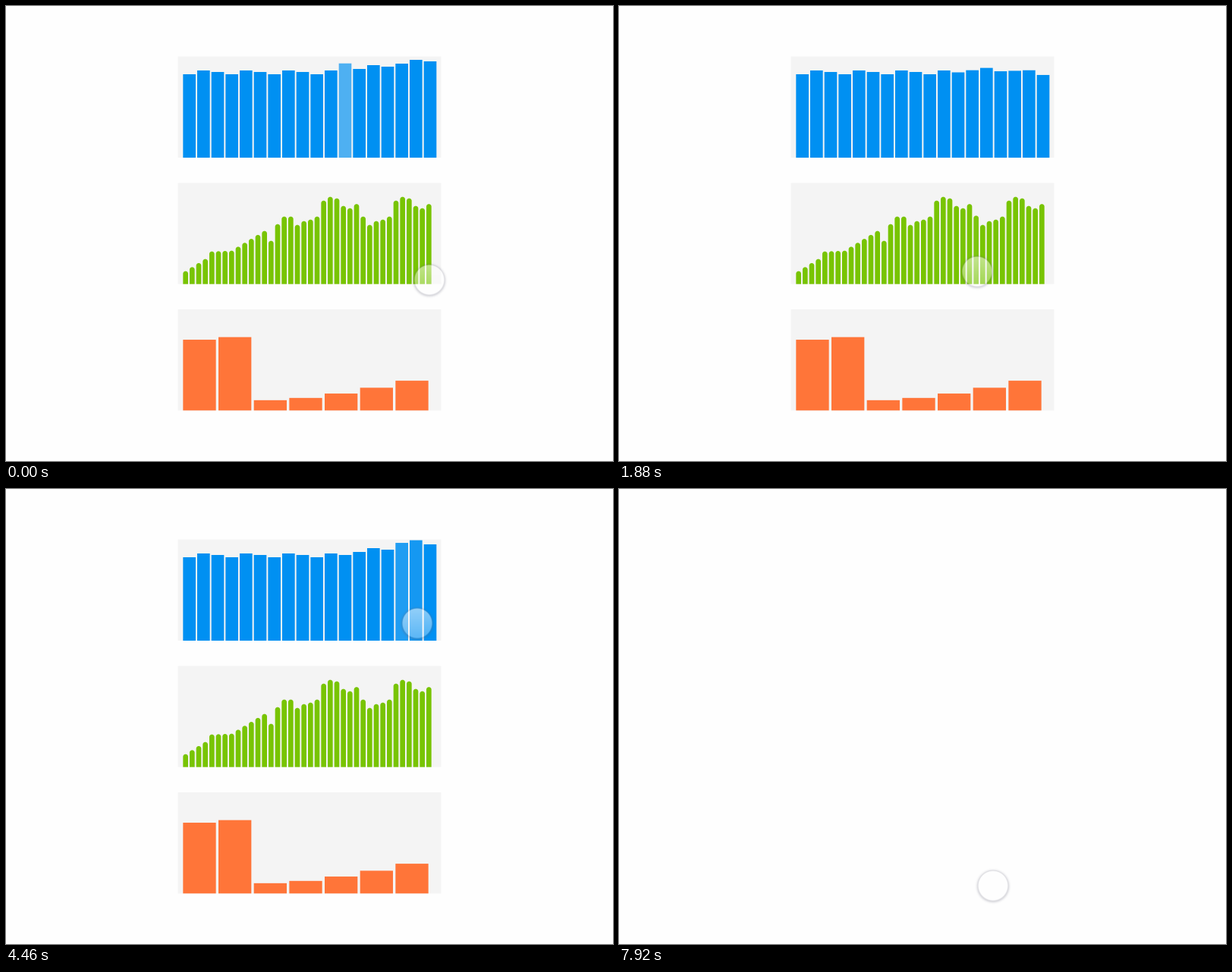
Animation, 800 px wide and 600 px high, one loop 8 s. Source, as a matplotlib script:

```python
import numpy as np
import matplotlib.pyplot as plt
from matplotlib.animation import FuncAnimation
from matplotlib.collections import PolyCollection
from matplotlib.colors import to_rgb
from matplotlib.patches import Polygon, Rectangle

W, H, DPI = 800, 600, 100
STEP, LOOP = 20, 8000
FRAMES = LOOP // STEP
BLANK, LOAD, TOUCH, RELOAD = 140, 360, 1660, 7920
FADE = 150       # hover transition, ms
UNIT = 10 / 3    # pixels per chart unit


def quad_out(u):
    return 1 - (1 - u ** 1.3) ** 2


def linear(u):
    return u


def back_out(u):
    return 1 + 2.70158 * (u - 1) ** 3 + 1.70158 * (u - 1) ** 2


class Chart:
    """Bars on a panel; bar and gap are in units, times in ms."""

    def __init__(self, color, row, heights, bar, gap, start, stagger, span,
                 ease, rounded=False):
        self.color = to_rgb(color)
        self.top = (20 + 50 * row) * UNIT
        self.base = self.top + 40 * UNIT
        self.heights = np.array(heights)
        n = np.arange(len(self.heights))
        self.width = bar * UNIT
        self.lefts = (70 + (bar + gap) * n) * UNIT
        self.begin = start + stagger * n
        self.span, self.ease, self.rounded = span, ease, rounded
        self.hover = np.zeros((FRAMES, len(n)))

    def hit(self, x, y):
        inside = (x >= self.lefts) & (x <= self.lefts + self.width)
        return inside & (y <= self.base) & (y >= self.base - self.heights)

    def outline(self, x, h):
        y = max(self.base - h, self.top)
        r = self.width / 2
        if self.rounded:
            a = np.linspace(np.pi, 0, 13)
            xs = x + r + r * np.cos(a)
            ys = np.minimum(y + r - r * np.sin(a), self.base)
        else:
            xs, ys = (x, x + 2 * r), (y, y)
        return [(x, self.base), *zip(xs, ys), (x + 2 * r, self.base)]

    def draw(self, coll, t, i):
        k = self.hover[i]
        h = self.heights * (1 + 0.1 * k)
        if t >= LOAD:
            h = h * self.ease(np.clip((t - self.begin) / self.span, 0, 1))
        shown = h > 0.3
        coll.set_verts([self.outline(x, v)
                        for x, v in zip(self.lefts[shown], h[shown])])
        coll.set_facecolor([(*self.color, 1 - 0.32 * a) for a in k[shown]])


# Blue: a repeating triple that steps up near the end.
blue_h = [(110, 115, 113)[i % 3] + 7 * max(0, i // 3 - 3) for i in range(18)]
# Green: a rough climb, then the same wave twice.
climb = np.interp(range(16), [0, 3, 4, 7, 12, 13, 14, 15],
                  [17, 33, 43, 44, 70, 57, 79, 89])
wave = [89, 78, 83, 85, 89, 110, 115, 113, 103, 100, 105.5]
# Orange: two tall bars, then a curve that rises from a low one.
orange_h = [93.3, 96.7] + [13.5 + 3 * k ** 1.55 for k in range(5)]

blue = Chart("#0090f2", 0, blue_h, 5, 0.6, 680, 35.8, 850, quad_out)
green = Chart("#78c402", 1, [*climb, *wave, *wave], 2, 0.6, 540, 25, 177,
              linear, rounded=True)
orange = Chart("#ff7539", 2, orange_h, 13, 1, 366, 45, 900, back_out)
charts = [blue, green, orange]

# Turning points of the pointer: time, x, y.
path = np.array([
    (TOUCH, 558, 361), (1880, 472, 350), (2150, 258, 400), (2480, 520, 492),
    (2920, 275, 260), (3060, 328, 174), (3240, 328, 172.5), (3540, 536, 176),
    (3980, 258, 498), (4340, 515, 199), (4430, 531, 179), (4460, 542, 177.5),
    (4560, 556, 185), (4940, 500, 340), (5540, 335, 338), (5640, 325.5, 337.5),
    (6050, 256, 500), (7000, 520, 506), (RELOAD, 493, 523)])


def pointer(t):
    return [np.interp(t, path[:, 0], path[:, c]) for c in (1, 2)]


# Hover amount of every bar: rises under the pointer, falls once it leaves.
for n in range(TOUCH // STEP + 1, RELOAD // STEP):
    for c in charts:
        move = np.where(c.hit(*pointer(n * STEP)), 1, -1) * STEP / FADE
        c.hover[n] = np.clip(c.hover[n - 1] + move, 0, 1)
blue.hover[:BLANK // STEP, 11] = 1  # still raised from the last tap


def touch_image():
    gy, gx = np.mgrid[-R + 0.25:R:0.5, -R + 0.25:R:0.5]
    disc = np.clip(20.2 - np.hypot(gx, gy), 0, 1)
    edge = np.clip(np.hypot(gx, gy - 0.8) - 19.5, 0, None)
    halo = 0.24 * np.exp(-edge ** 2 / 5)
    alpha = disc * (0.42 - 0.006 * gy) + (1 - disc) * halo
    shade = disc[..., None] + (1 - disc[..., None]) * np.array([0.38, 0.38, 0.46])
    return np.dstack([shade, alpha])


R = 27
fig = plt.figure(figsize=(W / DPI, H / DPI), dpi=DPI, facecolor="#fefefe")
ax = fig.add_axes([0, 0, 1, 1])
ax.axis("off")

panels = [ax.add_patch(Rectangle((68 * UNIT, c.top), 104 * UNIT, 40 * UNIT,
                                 fc="#f4f4f4", lw=0, snap=False))
          for c in charts]
bars = [ax.add_collection(PolyCollection([], linewidths=0, snap=False),
                          autolim=False) for c in charts]
spot = ax.imshow(touch_image(), extent=(0, 1, 1, 0), aspect="auto",
                 interpolation="bilinear", zorder=5)
head = np.array([(0, 0), (0, 8.6), (2, 6.8), (3.5, 10.2), (4.9, 9.6),
                 (3.5, 6.3), (6, 6.2)])
arrow = ax.add_patch(Polygon(head + (557.2, 360.8), fc="#2c2c2c", ec="white",
                             lw=0.4, zorder=6))


def draw(i):
    t = i * STEP
    page = t < BLANK or LOAD <= t < RELOAD
    for c, panel, coll in zip(charts, panels, bars):
        panel.set_visible(page)
        coll.set_visible(page)
        if page:
            c.draw(coll, t, i)

    x, y = pointer(t)
    arrow.set_visible(LOAD <= t < TOUCH)
    spot.set_alpha(1 if t >= TOUCH else float(np.clip((LOAD - t) / 140, 0, 1)))
    spot.set_extent((x - R, x + R, y + R, y - R))
    ax.set_xlim(0, W)
    ax.set_ylim(H, 0)
    return [*panels, *bars, spot, arrow]


anim = FuncAnimation(fig, draw, frames=FRAMES, interval=STEP, repeat=True,
                     repeat_delay=0, blit=False)
plt.show()
```
